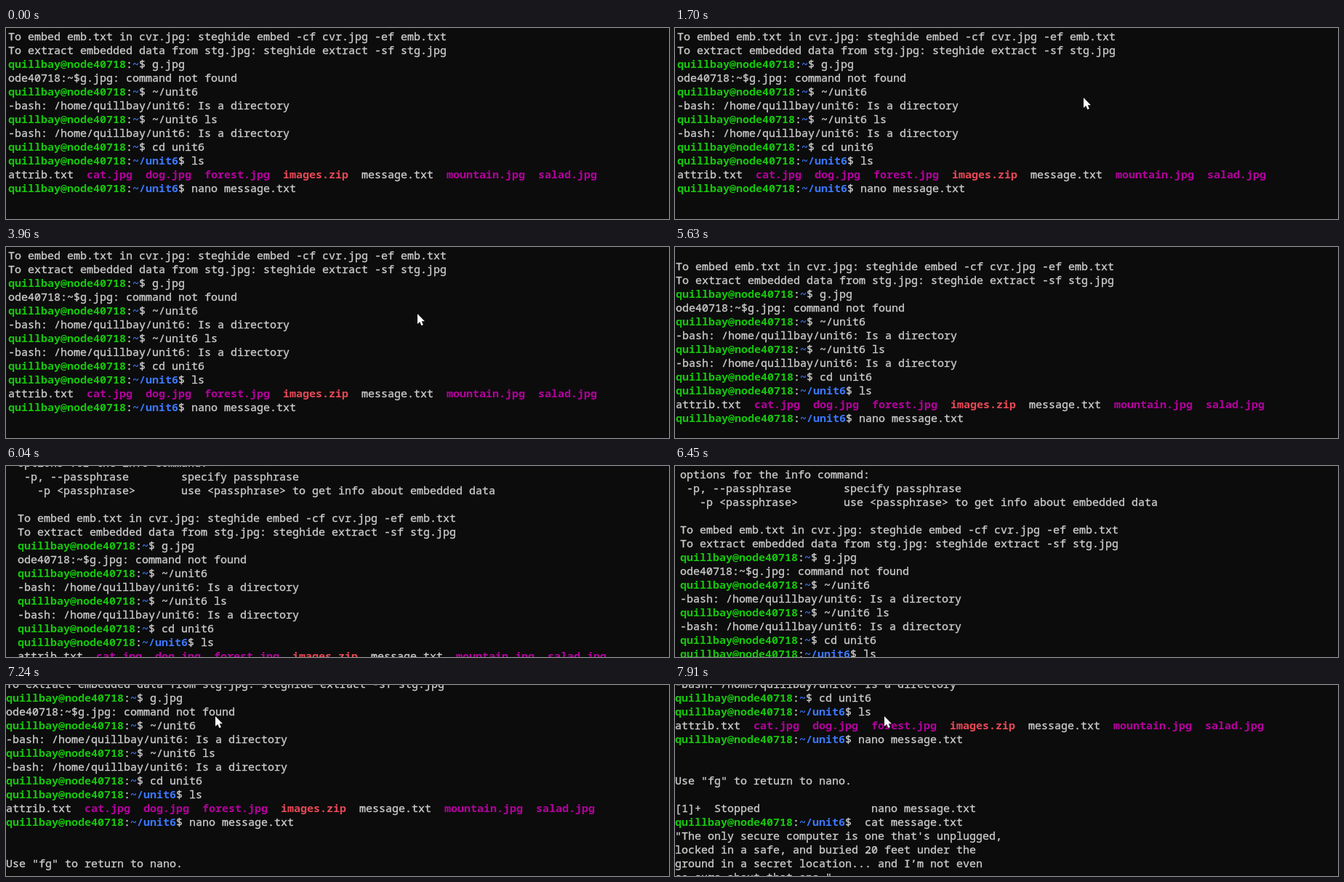
An HTML page that plays this animation: 912 px wide and 263 px high, repeating every 8000 ms.

```html
<!DOCTYPE html>
<html lang="en">
<head>
<meta charset="utf-8">
<title>Terminal session</title>
<style>
  html, body { margin: 0; width: 100%; height: 100%; overflow: hidden; background: #0c0c0c; }
  svg { display: block; width: 100vw; height: 100vh; }
  text {
    font: 15px "Noto Sans Mono", "Liberation Mono", monospace;
    font-variant-ligatures: none;
    white-space: pre;
    fill: #ccc;
    stroke: #ccc;
    stroke-width: .35px;
  }
  tspan[class] { font-weight: 700; stroke: none; }
  .green { fill: #16c60c; }
  .blue { fill: #3b78ff; }
  .pink { fill: #b4009e; }
  .red { fill: #e74856; }
  #pointer { fill: #fff; stroke: #000; stroke-width: 1; paint-order: stroke; }
</style>
</head>
<body>
<svg viewBox="0 0 912 263">
  <rect width="912" height="263" fill="#0c0c0c"/>
  <g id="screen"></g>
  <path id="pointer" d="M0 0V14L3.2 11.1L5.5 16.2L7.9 15.1L5.7 10.2H10Z"/>
</svg>
<script>
const LOOP = 8000, ROW = 19, NOTCH = 3 * ROW, BASELINE = 17, FIRST_ROW = -4;
const USER = "quillbay", HOST = "node40718";

const prompt = (dir, command) => [
  [USER + "@" + HOST, "green"], [":"], ["~" + dir, "blue"], ["$ " + command]
];
const plain = text => [[text]];
const isDirectory = plain(`-bash: /home/${USER}/unit6: Is a directory`);
const picture = name => [name + ".jpg  ", "pink"];

const lines = [
  plain("options for the info command:"),
  plain(" -p, --passphrase        specify passphrase"),
  plain("   -p <passphrase>       use <passphrase> to get info about embedded data"),
  [],
  plain("To embed emb.txt in cvr.jpg: steghide embed -cf cvr.jpg -ef emb.txt"),
  plain("To extract embedded data from stg.jpg: steghide extract -sf stg.jpg"),
  prompt("", "g.jpg"),
  plain(HOST.slice(1) + ":~$g.jpg: command not found"),
  prompt("", "~/unit6"),
  isDirectory,
  prompt("", "~/unit6 ls"),
  isDirectory,
  prompt("", "cd unit6"),
  prompt("/unit6", "ls"),
  [["attrib.txt  "], picture("cat"), picture("dog"), picture("forest"),
   ["images.zip  ", "red"], ["message.txt  "], picture("mountain"), picture("salad")],
  prompt("/unit6", "nano message.txt"),
  [],
  [],
  plain('Use "fg" to return to nano.'),
  [],
  plain("[1]+  Stopped                 nano message.txt"),
  prompt("/unit6", " cat message.txt"),
  plain('"The only secure computer is one that\'s unplugged,'),
  plain("locked in a safe, and buried 20 feet under the"),
  plain("ground in a secret location... and I\u2019m not even"),
  plain('so sure about that one."')
];

const linear = p => p;
const easeOut = p => 1 - (1 - p) ** 2.2;

// Stepped glide between two points; bend pushes the middle of the path aside.
function glide(t, start, end, steps, from, to, bend = [0, 0], ease = linear) {
  const step = Math.floor((t - start) / (end - start) * (steps - 1) + 0.1);
  const p = Math.min(1, step / (steps - 1));
  return from.map((v, k) =>
    Math.round(v + (to[k] - v) * ease(p) + bend[k] * Math.sin(Math.PI * p)));
}

// Wheel notches move the text three rows; the rest is the window being dragged.
function screenAt(t) {
  if (t >= 7840) return glide(t, 7840, 7910, 2, [0, -32 - NOTCH], [0, -32 - 2 * NOTCH]);
  if (t >= 6710) return glide(t, 6710, 7240, 9, [0, 68], [0, -32]);
  if (t >= 5630) return glide(t, 5630, 6510, 12, [1, 15], [3, 76], [14, 0], easeOut);
  if (t >= 3300) return glide(t, 3300, 3430, 2, [3, -NOTCH], [3, 0]);
  return [3, t >= 2430 ? -2 * NOTCH : 0];
}

function pointerAt(t) {
  if (t >= 7240) return [288, 43];
  if (t >= 5350) return null;
  if (t >= 4790) return glide(t, 4790, 5350, 9, [494, 72], [312, -18]);
  if (t >= 3960) return glide(t, 3960, 4720, 12, [566, 92], [509, 77], [84, 27]);
  if (t >= 3030) return null;
  if (t >= 1210) return glide(t, 1210, 1700, 8, [492, 20], [562, 96], [30, 0]);
  if (t >= 1010 || t < 730) return null;
  return glide(t, 730, 1010, 5, [301, 249], [357, 26]);
}

const make = (name, parent) =>
  parent.appendChild(document.createElementNS("http://www.w3.org/2000/svg", name));
const screen = document.getElementById("screen");
const pointer = document.getElementById("pointer");

lines.forEach((spans, i) => {
  const row = make("text", screen);
  row.setAttribute("y", BASELINE + (FIRST_ROW + i) * ROW);
  for (const [text, color] of spans) {
    const span = make("tspan", row);
    span.textContent = text;
    if (color) span.setAttribute("class", color);
  }
});

function place(node, spot) {
  node.setAttribute("visibility", spot ? "visible" : "hidden");
  if (spot) node.setAttribute("transform", `translate(${spot})`);
}

function draw(t) {
  place(screen, screenAt(t));
  place(pointer, pointerAt(t));
}

const begin = performance.now();
function tick() {
  draw((performance.now() - begin) % LOOP);
  requestAnimationFrame(tick);
}
tick();
</script>
</body>
</html>
```
